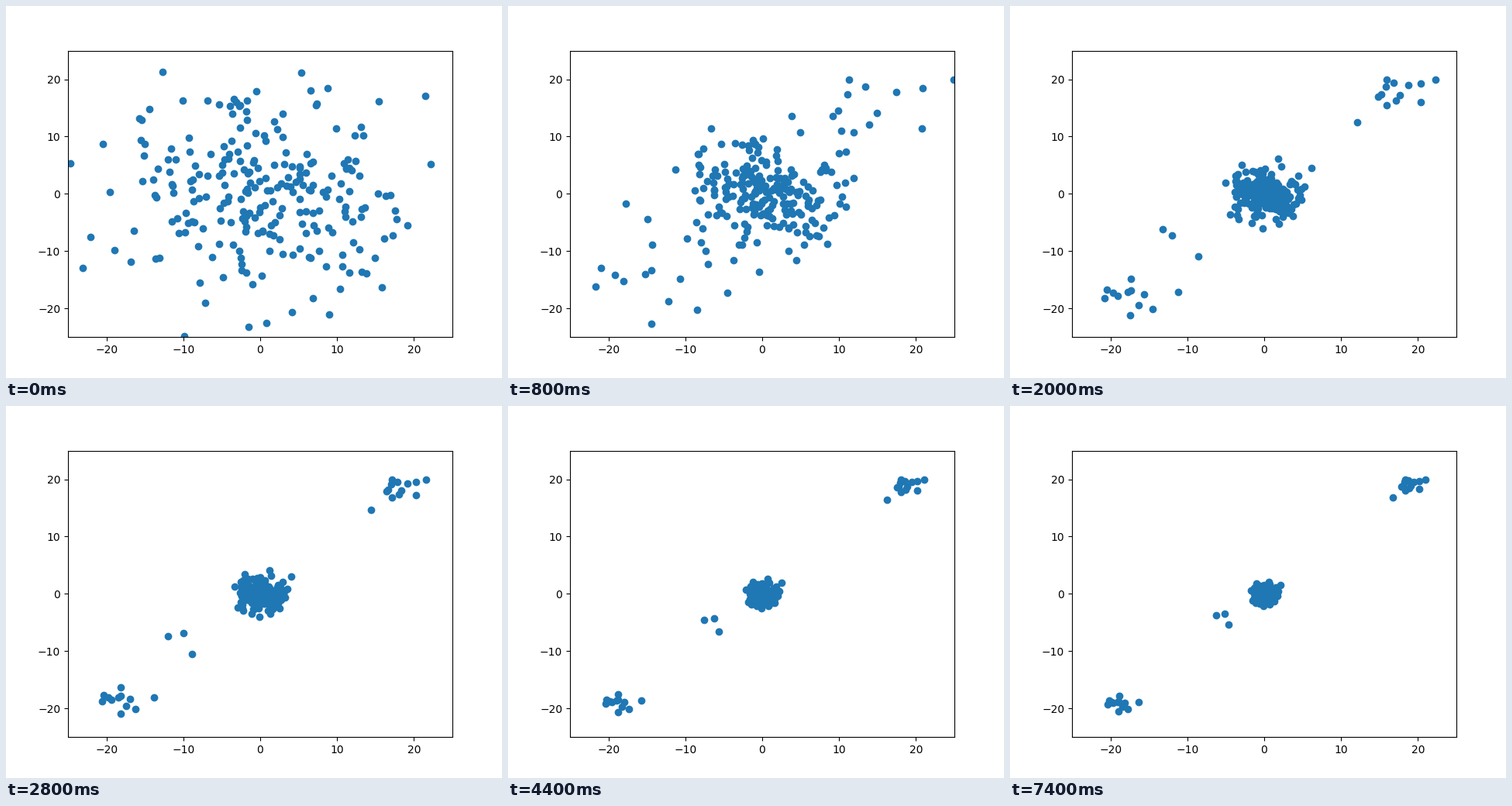
Recreate the animation shown at these times as a matplotlib script. Size 640 px wide and 480 px high, loop 8 s.

```python
import numpy as np
import matplotlib.pyplot as plt
from matplotlib.animation import FuncAnimation

FRAMES, INTERVAL = 40, 200
LAST_STEP = 37                # the picture rests after this step
COUNT, SIGMA = 244, 10        # size and spread of the starting cloud
DECAY = 0.177                 # shrink rate of the noise per step
INNER, CORNER = 0.08, 0.105   # share of the noise left at the end
GOAL, EDGE = 40, 20           # corner goal and watershed along the diagonal

# Stragglers and far points whose paths stand out
KEY_POINTS = np.array([
    (-4.8, -14.6), (-19.6, 0.3), (-24.7, 5.3), (12.4, 5.8), (9.9, 11.4),
    (0.8, -22.6), (-1.5, -23.2), (-9.9, -24.9), (-23.1, -12.9),
    (-22.1, -7.5), (29.0, 20.0), (21.5, 17.1), (22.2, 5.2), (5.3, 21.2),
    (9.0, -21.1), (-12.7, 21.3),
])


def split(xy):
    """Coordinates along and across the diagonal."""
    return xy[:, 0] + xy[:, 1], xy[:, 0] - xy[:, 1]


def join(along, across):
    return np.column_stack([along + across, along - across]) / 2


def cloud(count):
    """Normal points that lie clear of the watershed."""
    pts = np.random.RandomState(11).normal(0, SIGMA, (3 * count, 2))
    along, _ = split(pts)
    clear = np.abs(np.abs(along) - EDGE) > 2.5
    near = np.hypot(*pts.T) < 23
    return pts[clear & near][:count]


start = np.vstack([KEY_POINTS, cloud(COUNT - len(KEY_POINTS))])
along, across = split(start)
goal = np.where(np.abs(along) > EDGE, GOAL * np.sign(along), 0)
floor = np.where(goal != 0, CORNER, INNER)
# Points close to the watershed wait for a lower noise level
depart = 1 - np.exp(-np.abs(np.abs(along) - EDGE) / 3.5)


def positions(step):
    noise = floor + (1 - floor) * np.exp(-DECAY * step)
    rest = (along - goal) * np.minimum(1, noise / depart)
    return join(goal + rest, across * noise)


fig, ax = plt.subplots(figsize=(6.4, 4.8), dpi=100)
ax.set_xlim(-25, 25)
ax.set_ylim(-25, 25)
dots = ax.scatter(*start.T, color="#1f77b4")


def draw(frame):
    dots.set_offsets(positions(min(frame, LAST_STEP)))
    return [dots]


anim = FuncAnimation(fig, draw, frames=FRAMES, interval=INTERVAL,
                     init_func=lambda: draw(0), repeat=True, repeat_delay=0)
plt.show()
```
